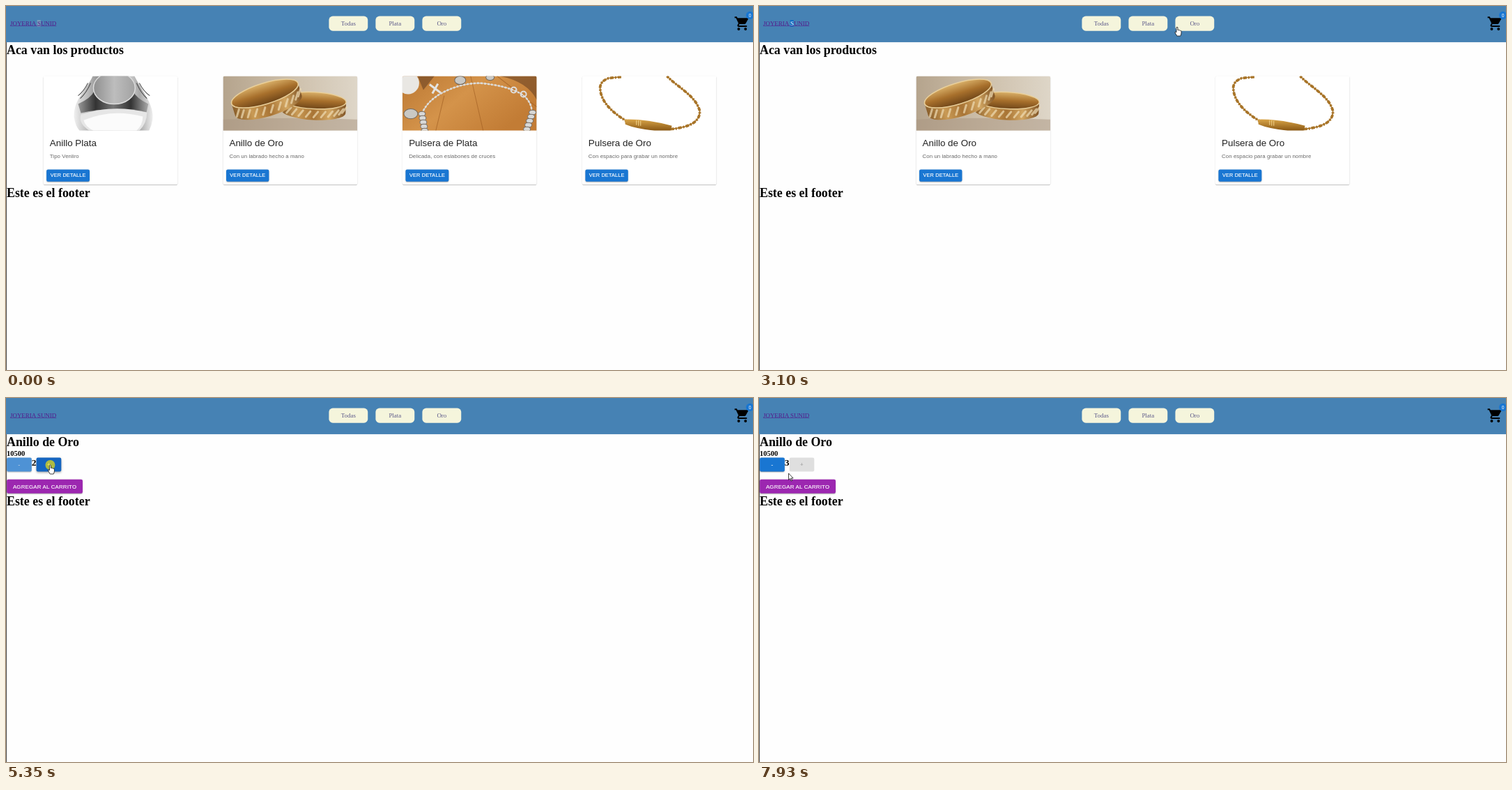
These frames come from a looping animation (1072 px wide and 522 px high, 8 s). An HTML page:

```html
<!DOCTYPE html>
<html lang="es">
<head>
<meta charset="utf-8">
<title>Joyeria</title>
<style>
html, body { margin: 0; width: 100%; height: 100%; overflow: hidden; background: #fefefe; }
#app { position: absolute; width: 1920px; height: 935px; transform: scale(.558333); transform-origin: 0 0;
  font: 16px "Liberation Serif", "Times New Roman", serif; color: #000; }
#app > *, .card, nav * { position: absolute; }
nav { width: 1920px; height: 93px; background: #4682b4; }
.logo { left: 10.7px; top: 36px; color: #551a8b; text-decoration: underline; white-space: nowrap; }
.logo span { position: static; }
nav button { top: 26px; width: 100px; height: 38px; border: 0; border-radius: 10px; padding: 0;
  background: #f5f5dc; color: #5d5a8a; font: inherit; }
.edge { top: 93px; width: 1.8px; height: 842px; background: #555; }
.badge { left: 1902px; top: 14px; width: 20px; height: 20px; border-radius: 10px; background: #1976d2;
  color: #fff; font: 12px/20px "Liberation Sans", Arial, sans-serif; text-align: center; }
h1, h2, h3 { margin: 0; white-space: nowrap; }
h1 { position: relative; top: .7px; font-size: 32px; line-height: 37px; }
h2 { font-size: 24px; line-height: 27.6px; }
h3 { font-size: 18.72px; line-height: 21.5px; }
#list, #detail { left: 1.8px; top: 94px; }
#list h1:last-child { position: absolute; top: 366.5px; }
.card { top: 86px; width: 345px; height: 279px; border-radius: 4px; background: #fff;
  font-family: "Liberation Sans", Arial, sans-serif;
  box-shadow: 0 2px 1px -1px #0003, 0 1px 1px #00000024, 0 1px 3px #0000001f; }
.card svg { display: block; width: 345px; height: 140px; border-radius: 4px 4px 0 0; }
.card b { display: block; margin: 16px 16px 8.4px; font: 24px/32px "Liberation Sans", Arial, sans-serif; color: #000000de; }
.card p { margin: 0 16px 23.5px; font-size: 14px; line-height: 20px; letter-spacing: .15px; color: #0009; }
.btn { border: 0; border-radius: 4px; min-width: 64px; height: 36.5px; padding: 0 16px; color: #fff;
  background: #1976d2; font: 14px/24.5px "Liberation Sans", Arial, sans-serif; letter-spacing: .02857em; white-space: nowrap;
  -webkit-text-stroke: .3px;
  box-shadow: 0 3px 1px -2px #0003, 0 2px 2px #00000024, 0 1px 5px #0000001f; }
.card .btn { margin-left: 8px; height: 30.75px; padding: 0 9.5px; font-size: 13px; }
.btn.hover { background: #1565c0; box-shadow: 0 2px 4px -1px #0003, 0 4px 5px #00000024, 0 1px 10px #0000001f; }
.btn.off { box-shadow: none; pointer-events: none; }
.row { display: flex; margin-bottom: 19.5px; }
#add { display: block; background: #9c27b0; }
#pointer { position: absolute; left: 0; top: 0; width: 1px; height: 1px; overflow: visible; pointer-events: none; }
</style>
</head>
<body>
<div id="app">
  <nav>
    <a class="logo">JOYERIA <span id="sel">S</span>UNID</a>
    <button style="left:830px">Todas</button>
    <button style="left:950px">Plata</button>
    <button style="left:1070px">Oro</button>
    <svg style="left:1871px;top:24px" width="42" height="42" viewBox="0 0 24 24"><path d="M7 18c-1.1 0-1.99.9-1.99 2S5.9 22 7 22s2-.9 2-2-.9-2-2-2zM1 2v2h2l3.6 7.59-1.35 2.45c-.16.28-.25.61-.25.96 0 1.1.9 2 2 2h12v-2H7.42c-.14 0-.25-.11-.25-.25l.03-.12.9-1.63h7.45c.75 0 1.41-.41 1.75-1.03l3.58-6.49A1 1 0 0 0 20 4H5.21l-.94-2zm16 16c-1.1 0-1.99.9-1.99 2s.89 2 1.99 2 2-.9 2-2-.9-2-2-2z"/></svg>
    <span class="badge">0</span>
  </nav>
  <div class="edge"></div>
  <div id="list"><h1>Aca van los productos</h1><div id="cards"></div><h1>Este es el footer</h1></div>
  <div id="detail">
    <h1>Anillo de Oro</h1>
    <h3>10500</h3>
    <div class="row"><button class="btn" id="minus">-</button><h2 id="count">1</h2><button class="btn" id="plus">+</button></div>
    <button class="btn" id="add">AGREGAR AL CARRITO</button>
    <h1>Este es el footer</h1>
  </div>
</div>
<svg id="pointer">
  <circle id="flash" r="7" fill="#ffe800" opacity=".65"/>
  <g fill="#fff" stroke="#111" stroke-width=".8" stroke-linejoin="round">
    <path id="arrow" d="M0 0V9.5L2.2 7.4 3.8 11 5.2 10.4 3.7 7H6.6Z"/>
    <path id="hand" d="M-1 .8Q0-.6 1 .8V4.5Q2 3.8 2.8 4.8 4 4.2 4.5 5.3 5.8 5 6 6.2V9Q5.8 11 4.8 13H-.2Q-2 10-3.2 7.6-2.6 6.6-1 7.6Z"/>
  </g>
</svg>
<script>
const $ = id => document.getElementById(id);
const grad = (id, dir, ...colors) => `<linearGradient id="${id}" ${dir}>` +
  colors.map((c, i) => `<stop offset="${i / (colors.length - 1)}" stop-color="${c}"/>`).join('') + '</linearGradient>';
const down = 'x2="0" y2="1"';

// Band seen from slightly above, with slanted engraving along its front
function band(x, y, rx, ry, h, turn) {
  let cuts = '';
  for (let a = .3; a < 2.9; a += .24)
    cuts += `M${rx * Math.cos(a) - 3} ${ry * Math.sin(a) + h * .75}l6 ${-h * .5}`;
  return `<g transform="translate(${x} ${y}) rotate(${turn})">
    <path d="M${-rx} 0V${h}A${rx} ${ry} 0 0 0 ${rx} ${h}V0Z" fill="url(#gold)"/>
    <ellipse rx="${rx}" ry="${ry}" fill="url(#inside)" stroke="#e9cf9a" stroke-width="1.5"/>
    <path d="${cuts}" stroke="#efdcb4" stroke-width="3" stroke-linecap="round" opacity=".7"/></g>`;
}
const chain = (d, color, w, dash) => `<path d="${d}" fill="none" stroke="${color}" stroke-width="${w * .45}"/>
  <path d="${d}" fill="none" stroke="${color}" stroke-width="${w}" stroke-dasharray="${dash}"/>`;
const beads = (x, y, dx) => [0, 1, 2, 3, 4].map(i =>
  `<ellipse cx="${x + dx * i}" cy="${y + 6 * i}" rx="5" ry="3.4" fill="#d8d8d6" stroke="#77706a"/>`).join('');

const pictures = {
  signet: `${grad('steel', '', '#f0f0f0', '#bdbdbd', '#8a8a8a', '#b0b0b0', '#d8d8d8', '#a8a8a8', '#efefef')}${grad('face', '', '#8f8f8f', '#bdbdbd', '#a2a2a2')}${grad('shade', '', '#999', '#333', '#777', '#333', '#aaa')}
    <path d="M71 0C62 20 44 32 44 58Q46 72 52 78H152Q160 62 156 48C152 32 140 18 131 0Z" fill="url(#steel)"/>
    <path d="M50 40Q68 32 73 22Q101 54 129 22Q134 32 151 40L148 53Q100 42 54 53Z" fill="url(#shade)"/>
    <path d="M54 55Q100 40 149 52 149 68 138 78H66Q50 68 54 55Z" fill="#e6e6e6"/>
    <path d="M58 63Q100 46 143 58 143 70 134 78H72Q60 72 58 63Z" fill="#fbfbfb"/>
    <path d="M68 10Q62 24 53 32M64 10Q58 22 50 28M134 10Q140 24 149 32M138 10Q144 22 153 28" fill="none" stroke="#4a4a4a"/>
    <ellipse cx="102" cy="17" rx="30" ry="23" fill="url(#face)" stroke="#ddd" stroke-width="1.5"/>`,
  bands: `${grad('cloth', '', '#b5a48d', '#cdbfaa', '#ded6c8')}${grad('gold', '', '#8a5f2b', '#c99a55', '#a87435', '#d2a662', '#805425')}${grad('inside', down, '#d9b069', '#a8702c', '#6e4518')}
    <path d="M0 0H193V78H0Z" fill="url(#cloth)"/><path d="M0 62Q100 58 193 62V78H0Z" fill="#a99682" opacity=".5"/>
    ${band(131, 35, 46, 12, 16, 3)}${band(60, 25, 50, 15, 18, -17)}`,
  charms: `${grad('wood', 'x2="1" y2=".5"', '#bb7833', '#d4934a', '#c27c35')}
    <path d="M0 0H193V78H0Z" fill="url(#wood)"/>
    <path d="M140 0H193V34Q180 8 140 0M22 0H46L30 20Z" fill="#6b4423" opacity=".6"/>
    <path d="M98 0L116 78M60 28L48 78M136 0L193 44" stroke="#9c5a20" opacity=".6"/>
    <circle cx="8" cy="10" r="16" fill="#e9e7e3"/>
    ${chain('M28 54Q36 34 61 22T112 10Q150 14 168 24T186 52', '#dcdcda', 2.6, '3 2')}
    <path d="M39 12L55 24M51 11L43 25" stroke="#e4e4e2" stroke-width="3"/>
    <g fill="#c9c8c4" stroke="#70685f"><ellipse cx="83" cy="6" rx="8" ry="6"/><ellipse cx="12" cy="54" rx="10" ry="7"/><ellipse cx="126" cy="2" rx="6" ry="4"/></g>
    <g fill="none" stroke="#dedede" stroke-width="2"><circle cx="160" cy="20" r="4"/><circle cx="174" cy="26" r="4"/></g>
    ${beads(28, 54, 1)}${beads(187, 52, -2)}`,
  plate: `${grad('bar', down, '#d9a548', '#8a5814')}
    ${chain('M56 1L38 3Q24 8 26 20C28 36 40 50 63 64', '#a87428', 3.8, '5 2 2 2')}
    ${chain('M127 76Q170 72 169 50C164 28 134 14 122 0', '#a87428', 3.8, '5 2 2 2')}
    <path d="M61 62Q90 61 129 71L127 78H104Q76 75 62 69Z" fill="url(#bar)"/>
    <path d="M78 63V70M81 63V71M84 64V71" stroke="#f3d48c"/>`
};
const items = [
  ['Anillo Plata', 'Tipo Venliro', 'signet', 'plata'],
  ['Anillo de Oro', 'Con un labrado hecho a mano', 'bands', 'oro'],
  ['Pulsera de Plata', 'Delicada, con eslabones de cruces', 'charms', 'plata'],
  ['Pulsera de Oro', 'Con espacio para grabar un nombre', 'plate', 'oro']
];
$('cards').innerHTML = items.map(([name, text, pic]) => `<div class="card">
  <svg viewBox="0 0 193 78" preserveAspectRatio="none">${pictures[pic]}</svg>
  <b>${name}</b><p>${text}</p><button class="btn">VER DETALLE</button></div>`).join('');
const cards = [...$('cards').children];

// Pointer stops: time, x, y
const path = [
  [130, 719, 414], [500, 380, 325], [850, 88, 203], [900, 88, 205], [1050, 88, 241], [1200, 94, 242],
  [1740, 532, 27], [1950, 562, 27], [2030, 563, 27], [2150, 577.5, 26.5], [2500, 632, 22], [3090, 632, 22],
  [3100, 600, 30], [3880, 246, 231], [3980, 258, 242], [4060, 258, 242], [4370, 83, 154], [4720, 63, 96],
  [5560, 63.5, 96], [5900, 20, 96], [6250, 20, 96], [6740, 69.5, 96.5], [7230, 67, 97], [7600, 45, 101], [7930, 42.5, 108]
];
const FOCUS = 2000, GOLD = 3100, OPEN = 4050;
const steps = [[5230, 2], [6080, 1], [6850, 2], [7060, 3]];
const clicks = [FOCUS, 2830, OPEN - 60, ...steps.map(s => s[0])];

const smooth = p => p * p * (3 - 2 * p);
function pointerAt(t) {
  const i = path.findIndex(k => k[0] > t);
  if (i < 0) return path.at(-1).slice(1);
  const [t0, x0, y0] = path[i - 1], [t1, x1, y1] = path[i], p = smooth((t - t0) / (t1 - t0));
  return [x0 + (x1 - x0) * p, y0 + (y1 - y0) * p];
}

// Fade a counter button between enabled and disabled
function setEnabled(btn, on, was, age) {
  const p = on === was ? 1 : 1 - (1 - Math.min(1, age / 250)) ** 2;
  const base = btn.classList.contains('hover') ? '#1565c0' : '#1976d2';
  const mix = (a, b) => `color-mix(in srgb, ${on ? a : b} ${p * 100}%, ${on ? b : a})`;
  btn.style.background = mix(base, 'rgba(0,0,0,.12)');
  btn.style.color = mix('#fff', 'rgba(0,0,0,.26)');
}

function draw() {
  const t = performance.now() % 8000;
  const kind = t < FOCUS ? '' : t < GOLD ? 'plata' : 'oro';
  const shown = cards.filter((c, i) => !kind || items[i][3] === kind);
  const gap = (1962.5 - 345 * shown.length) / (shown.length + 1);
  cards.forEach(c => c.style.display = 'none');
  shown.forEach((c, i) => { c.style.display = 'block'; c.style.left = gap - 21.8 + i * (345 + gap) + 'px'; });
  $('list').style.display = t < OPEN ? 'block' : 'none';
  $('detail').style.display = t < OPEN ? 'none' : 'block';

  const done = steps.filter(s => s[0] <= t);
  const [since, n] = done.at(-1) || [0, 1], before = (done.at(-2) || [0, 1])[1];
  $('count').textContent = n;
  $('minus').classList.toggle('off', n === 1);
  $('plus').classList.toggle('off', n === 3);

  const sel = $('sel').style;
  sel.background = t < FOCUS ? 'rgba(200,200,200,.4)' : t < steps[0][0] ? '#0d6cc4' : 'none';
  sel.color = t >= FOCUS && t < steps[0][0] ? '#fff' : '';

  document.querySelectorAll('.hover').forEach(e => e.classList.remove('hover'));
  $('pointer').style.display = t < 130 ? 'none' : 'block';
  if (t >= 130) {
    const [x, y] = pointerAt(t);
    const over = document.elementFromPoint(x, y)?.closest('button');
    over?.classList.add('hover');
    $('pointer').style.transform = `translate(${x}px, ${y}px)`;
    $('arrow').style.display = over ? 'none' : '';
    $('hand').style.display = over ? '' : 'none';
    $('flash').style.display = clicks.some(c => t >= c && t < c + (c === 2830 ? 70 : 150)) ? '' : 'none';
  }
  setEnabled($('minus'), n > 1, before > 1, t - since);
  setEnabled($('plus'), n < 3, before < 3, t - since);
  requestAnimationFrame(draw);
}
draw();
</script>
</body>
</html>
```
